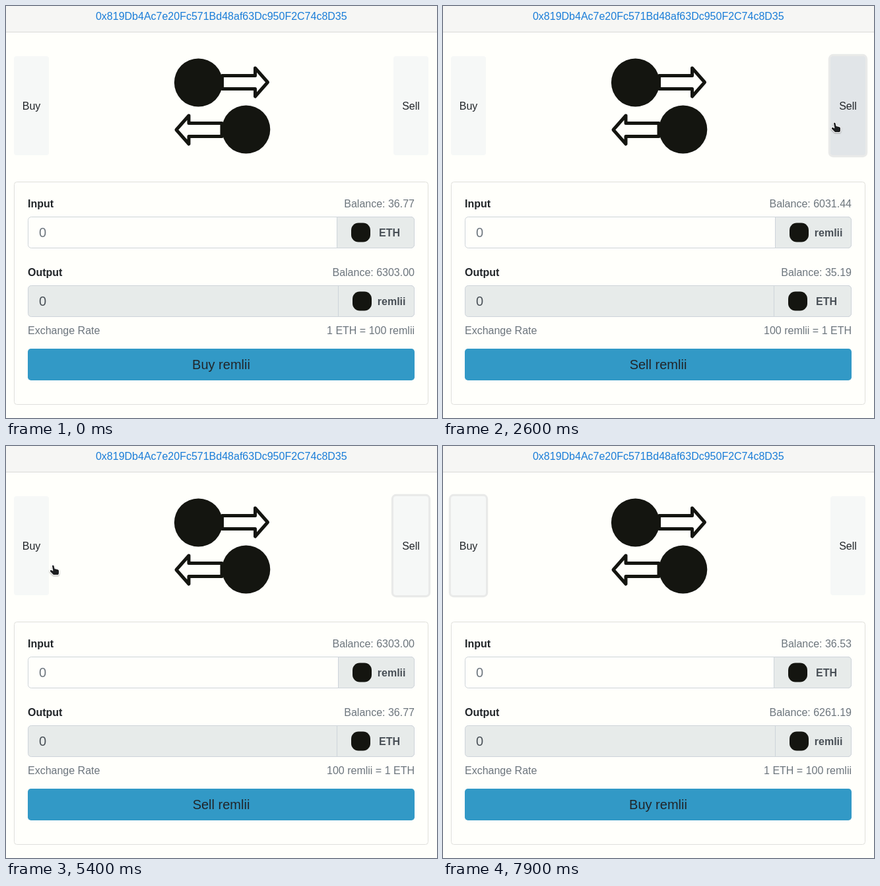
Animation, 653 px wide and 624 px high, one loop 8 s. Source, as an HTML page with a canvas:

```html
<!DOCTYPE html>
<html lang="en">
<head>
<meta charset="utf-8">
<title>Token swap</title>
<style>
html, body { margin: 0; width: 100%; height: 100%; overflow: hidden; background: #fffffb; }
canvas { display: block; width: 653px; height: 624px; }
</style>
</head>
<body>
<canvas id="stage" width="653" height="624"></canvas>
<script>
const ctx = document.getElementById('stage').getContext('2d');
const LOOP = 8000, STEP = 100;
const TOKEN = 'remlii';
const ADDRESS = '0x819Db4Ac7e20Fc571Bd48af63Dc950F2C74c8D35';
const PAGE = '#fffffb', INK = '#212529', MUTED = '#6c757d', FIELD = '#495057';
const LINE = '#ced4da', ADDON = '#e7ebea', MARK = '#141510';

const SELL = { at: 1383.68, span: 2699.5 };
const BUY = { at: 5999.9, span: 2699.3 };
const FUNDS = { ETH: 36.77, [TOKEN]: 6303 };

const clamp = v => Math.min(1, Math.max(0, v));
const smooth = u => u * u * (3 - 2 * u);
const mix = (a, b, u) => a + (b - a) * u;

// 150 ms transition in at one time and out at another
const fade = (t, from, to) =>
  smooth(clamp((t - from) / 150)) - smooth(clamp((t - to) / 150));

function text(str, x, y, color, { size = 16, bold = false, align = 'left' } = {}) {
  ctx.font = `${bold ? 'bold ' : ''}${size}px "Liberation Sans", Arial, sans-serif`;
  ctx.textAlign = align;
  ctx.fillStyle = color;
  ctx.fillText(str, x, y);
}

function box(x, y, w, h, r, fill, stroke) {
  ctx.beginPath();
  ctx.roundRect(x, y, w, h, r);
  if (fill) { ctx.fillStyle = fill; ctx.fill(); }
  if (stroke) { ctx.strokeStyle = stroke; ctx.lineWidth = 1; ctx.stroke(); }
}

function polygon(points) {
  ctx.beginPath();
  points.forEach(([x, y]) => ctx.lineTo(x, y));
  ctx.closePath();
}

function disc(x, y, r) {
  ctx.beginPath();
  ctx.arc(x, y, r, 0, 2 * Math.PI);
  ctx.fillStyle = MARK;
  ctx.fill();
}

function header() {
  ctx.fillStyle = '#f6f6f4';
  ctx.fillRect(0, 0, 653, 39);
  ctx.fillStyle = '#d9d9d7';
  ctx.fillRect(0, 39, 653, 1);
  text(ADDRESS, 326.3, 21, '#1a7dd8', { align: 'center' });
}

function sideButton(label, x, hover, focus) {
  if (focus > 0) {
    const grow = 3.2 * focus;
    box(x - grow, 76 - grow, 53 + 2 * grow, 150 + 2 * grow, 4 + grow,
      `rgba(216,217,219,${0.55 * focus})`);
  }
  const shade = [[246, 225], [248, 229], [247, 232]].map(([a, b]) => mix(a, b, hover));
  box(x, 76, 53, 150, 4, `rgb(${shade})`);
  text(label, x + 26.5, 157, INK, { align: 'center' });
}

function arrow(tail, y, dir) {
  const neck = tail + 50 * dir, tip = tail + 69 * dir;
  polygon([[tail, y - 10], [neck, y - 10], [neck, y - 21.5], [tip, y],
    [neck, y + 21.5], [neck, y + 10], [tail, y + 10]]);
  ctx.strokeStyle = MARK;
  ctx.lineWidth = 5;
  ctx.lineJoin = 'round';
  ctx.stroke();
}

function swapSign() {
  arrow(327.5, 115.5, 1);
  arrow(327, 187.5, -1);
  disc(291.5, 116, 36.6);
  disc(363.7, 187, 36.6);
}

function row(label, y, unit, share, readOnly) {
  const isEth = unit === 'ETH';
  const split = isEth ? 501.5 : 503.5;
  text(label, 33, y - 14, INK, { bold: true });
  text('Balance: ' + (FUNDS[unit] * share).toFixed(2), 619, y - 14, MUTED, { align: 'right' });
  box(33.5, y + 0.5, 585, 47, 4.8, readOnly ? ADDON : PAGE, LINE);
  box(split, y + 0.5, 618.5 - split, 47, [0, 4.8, 4.8, 0], ADDON, LINE);
  text('0', 50, y + 31, readOnly ? FIELD : MUTED, { size: 20 });
  box(isEth ? 523 : 525, y + 9.5, 29, 29, 11, MARK);
  text(unit, isEth ? 565.1 : 562.8, y + 30, FIELD, { bold: true });
}

// exponential ease-out of the balance counters
function progress(t, { at, span }) {
  const u = (t - at) / span;
  return u >= 1 ? 1 : (1 - 2 ** (-10 * u)) * 1024 / 1023;
}

function card(t) {
  const buying = t < SELL.at || t >= BUY.at;
  const share = t < SELL.at ? 1 : progress(t, buying ? BUY : SELL);
  const [input, output] = buying ? ['ETH', TOKEN] : [TOKEN, 'ETH'];
  box(12.5, 266.5, 627, 337, 4, PAGE, '#dfdfdc');
  row('Input', 319, input, share, false);
  row('Output', 423, output, share, true);
  text('Exchange Rate', 33, 497, MUTED);
  text(buying ? `1 ETH = 100 ${TOKEN}` : `100 ${TOKEN} = 1 ETH`, 619, 497, MUTED, { align: 'right' });
  box(33, 519, 586, 48, 4.8, '#3299c6');
  text(`${buying ? 'Buy' : 'Sell'} ${TOKEN}`, 326, 550, INK, { size: 20, align: 'center' });
}

function pointerAt(t) {
  if (t < 500 || t >= 6900) return null;
  if (t < 1000) {
    const u = 1 - (1 - (t - 500) / 500) ** 3;
    return [mix(29, 588, u), mix(259, 175, u)];
  }
  if (t < 5500) {
    const u = smooth(clamp((t - 4700) / 700));
    return [mix(588, 65.5, u), mix(175, 178.5, u)];
  }
  if (t < 5800) return [t < 5600 ? 63 : 61, 178.5];
  return [49, 181.5];
}

const HAND = [[4, 2.6], [5, 1.5], [6.4, 2.2], [7.6, 7], [12.6, 8.3], [14, 9.6],
  [14, 14], [13, 16], [6, 16], [1, 11], [1, 9.2], [2.6, 9], [5.4, 10.6]];
const POINTER = [[1, 1], [1, 15], [4.5, 12], [6.5, 17], [8.8, 16], [6.8, 11.2], [11.2, 11]];

function cursor(t) {
  const spot = pointerAt(t);
  if (!spot) return;
  const overButton = spot[0] > 580 || spot[0] < 70 && t > 1000;
  ctx.save();
  ctx.translate(Math.round(spot[0]), Math.round(spot[1]));
  polygon(overButton ? HAND : POINTER);
  ctx.lineJoin = 'round';
  ctx.lineWidth = 2.2;
  ctx.strokeStyle = '#fff';
  ctx.shadowColor = 'rgba(0,0,0,.35)';
  ctx.shadowBlur = 2;
  ctx.shadowOffsetY = 1;
  ctx.stroke();
  ctx.shadowColor = 'transparent';
  ctx.fillStyle = '#1c1e20';
  ctx.fill();
  ctx.restore();
}

function draw(now) {
  const t = Math.floor(now % LOOP / STEP) * STEP;
  ctx.fillStyle = PAGE;
  ctx.fillRect(0, 0, 653, 624);
  header();
  sideButton('Buy', 12, fade(t, 5450, 6850), fade(t, 5950, LOOP));
  sideButton('Sell', 587, fade(t, 850, 4750), fade(t, 1340, 5950));
  swapSign();
  card(t);
  cursor(t);
}

let start;
function tick(now) {
  start ??= now;
  draw(now - start);
  requestAnimationFrame(tick);
}
draw(0);
requestAnimationFrame(tick);
</script>
</body>
</html>
```
